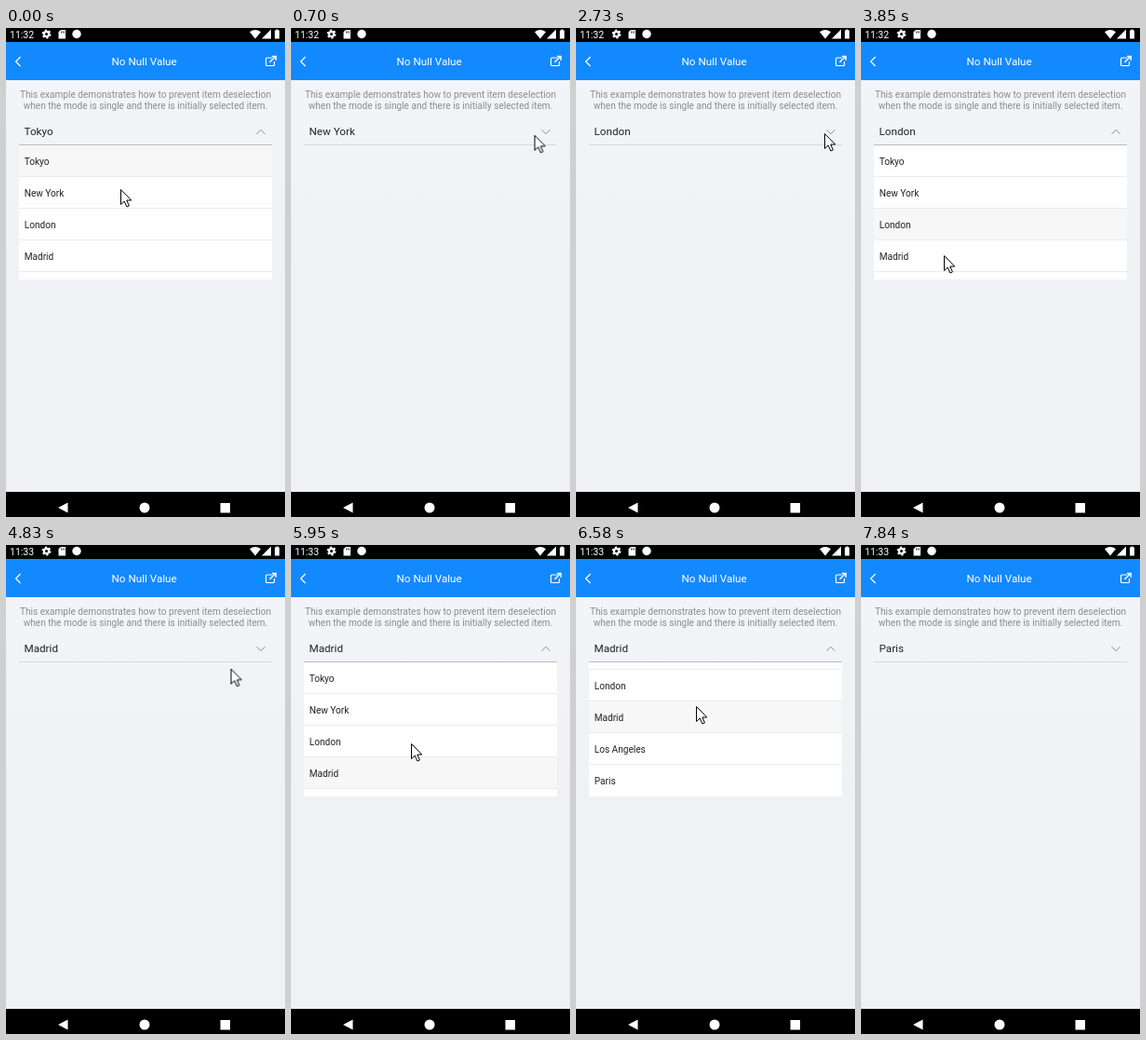
Animation of 300x525 px, one loop 9.8 s. Source, as an HTML page:

```html
<!DOCTYPE html>
<html lang="en">
<head>
<meta charset="utf-8">
<title>No Null Value</title>
<style>
html, body { margin: 0; width: 100%; height: 100%; overflow: hidden; background: #f0f1f4; }
svg { display: block; font-family: Roboto, sans-serif; }
.app { --pick: 0; --open: 1; --minute: 0; animation: state 9.8s step-end infinite; }
.title { font-size: 11.68px; fill: #fff; }
.hint { font-size: 10.1px; fill: #8b8c90; text-anchor: middle; }
.label { font-size: 11.68px; fill: #222; transform: translateY(calc(var(--pick) * -30px)); }
.clock { font-size: 10.5px; fill: #fff; transform: translateY(calc(var(--minute) * -20px)); }
.arrow { transform-origin: 274px 111.5px; transform: scaleY(calc(var(--open) * 2 - 1)); }
.line { opacity: calc(.45 + var(--open) * .55); }
.list { animation: fade 9.8s linear infinite; }
.items { font-size: 10.1px; fill: #222; animation: scroll 9.8s ease-out infinite; }
.chosen { fill: #f7f7f7; transform: translateY(calc(var(--pick) * 34px)); }
.cursor { animation: move 9.8s ease-in-out infinite; }

@keyframes state {
  0% { --pick: 0; --open: 1; --minute: 0; }
  1.43% { --pick: 1; }
  2.14% { --open: 0; }
  11.43% { --open: 1; }
  19.29% { --pick: 2; }
  20.71% { --open: 0; }
  31.43% { --open: 1; }
  42.14% { --pick: 3; }
  43.57% { --open: 0; }
  46.43% { --minute: 1; }
  54.29% { --open: 1; }
  72.86% { --pick: 5; }
  74.29% { --open: 0; }
  100% { --pick: 5; --open: 0; --minute: 1; }
}
@keyframes fade {
  0%, 2.14% { opacity: 1; }
  3.57%, 12.14% { opacity: 0; }
  13.57%, 20.71% { opacity: 1; }
  22.14%, 32.14% { opacity: 0; }
  34.29%, 43.57% { opacity: 1; }
  45%, 55% { opacity: 0; }
  56.43%, 74.29% { opacity: 1; }
  75.71%, 99.99% { opacity: 0; }
  100% { opacity: 1; }
}
@keyframes scroll {
  0%, 64.9% { transform: none; }
  67.1%, 80% { transform: translateY(-60px); }
  80.01%, 100% { transform: none; }
}
@keyframes move {
  0%, 2.14% { transform: translate(123px, 173px); animation-timing-function: linear; }
  5%, 5.71% { transform: translate(245px, 121px); animation-timing-function: ease-out; }
  8.57%, 12.14% { transform: translate(269px, 112px); }
  15% { transform: translate(73px, 211px); }
  17.14%, 20.71% { transform: translate(71px, 211px); }
  27.86% { transform: translate(267px, 113px); }
  29.29%, 32.14% { transform: translate(269px, 112px); }
  39.29% { transform: translate(89px, 244px); }
  40.71%, 43.57% { transform: translate(89px, 247px); }
  51.43%, 55% { transform: translate(269px, 112px); }
  60.71% { transform: translate(129px, 213px); }
  64.29%, 64.6% { transform: translate(129px, 249px); }
  67.14%, 67.86% { transform: translate(129px, 173px); }
  70.71%, 73.57% { transform: translate(129px, 252px); animation-timing-function: ease-in; }
  77.14%, 77.8% { transform: translate(184px, 430px); animation-timing-function: linear; }
  78.57% { transform: translate(219px, 507px); animation-timing-function: linear; }
  79.7%, 99.99% { transform: translate(235px, 540px); }
  100% { transform: translate(123px, 173px); }
}
</style>
</head>
<body>
<svg class="app" width="300" height="525" viewBox="0 0 300 525">
  <defs>
    <linearGradient id="page" x2="0" y2="1">
      <stop stop-color="#f3f4f7"/>
      <stop offset=".5" stop-color="#f0f1f4"/>
    </linearGradient>
  </defs>
  <rect y="56" width="300" height="442" fill="url(#page)"/>

  <!-- status bar -->
  <rect width="300" height="15"/>
  <svg x="4" width="30" height="15">
    <g class="clock"><text y="11">11:32</text><text y="31">11:33</text></g>
  </svg>
  <g fill="#fff">
    <circle cx="43.5" cy="6.5" r="2.6" fill="none" stroke="#fff" stroke-width="2.2"/>
    <circle cx="43.5" cy="6.5" r="4.2" fill="none" stroke="#fff" stroke-width="1.5" stroke-dasharray="2.2"/>
    <path d="M59 2h5v9.5h-7.500V4.200z"/>
    <path d="M59.500 3.500v2M61 3.500v2M62.500 3.500v2" stroke="#000" stroke-width=".7"/>
    <circle cx="76" cy="6.500" r="4.700"/>
    <path d="M262 4.300Q268 -.500 274 4.300L268 11.500z"/>
    <path d="M285 1.500v10h-10z"/>
    <path d="M290.500 1.500h2v1h1.500v9h-5v-9h1.500z"/>
  </g>

  <!-- header -->
  <rect y="15" width="300" height="41" fill="#1389ff"/>
  <text class="title" x="113.500" y="40.300">No Null Value</text>
  <g fill="none" stroke="#fff" stroke-width="1.200">
    <path d="M15.500 31l-5 5 5 5"/>
    <path d="M286 32h-5.500q-1 0-1 1v6.500q0 1 1 1h7q1 0 1-1V36"/>
    <path d="M283.500 36.800l6-6M286 30.500h4.200v4.200" stroke-width="1.500"/>
  </g>

  <text class="hint" x="150" y="74.700">This example demonstrates how to prevent item deselection</text>
  <text class="hint" x="150" y="86.700">when the mode is single and there is initially selected item.</text>

  <!-- combo box -->
  <svg x="19.500" y="96" width="200" height="28">
    <g class="label">
      <text y="19">Tokyo</text>
      <text y="49">New York</text>
      <text y="79">London</text>
      <text y="109">Madrid</text>
      <text y="139">Los Angeles</text>
      <text y="169">Paris</text>
    </g>
  </svg>
  <path class="arrow" d="M269.500 113.800l4.500-4.500 4.500 4.500" fill="none" stroke="#8b8c90"/>
  <path class="line" d="M14 125.500h272" stroke="#b9bbc1"/>

  <svg class="list" x="14" y="126" width="272" height="144">
    <rect width="272" height="144" fill="#fefefe"/>
    <g class="items">
      <rect class="chosen" width="272" height="34"/>
      <path d="M0 33.500h272M0 67.500h272M0 101.500h272M0 135.500h272M0 169.500h272" stroke="#ececee"/>
      <g transform="translate(5.700 21)">
        <text>Tokyo</text>
        <text y="34">New York</text>
        <text y="68">London</text>
        <text y="102">Madrid</text>
        <text y="136">Los Angeles</text>
        <text y="170">Paris</text>
      </g>
    </g>
  </svg>

  <!-- navigation bar -->
  <rect y="498" width="300" height="27"/>
  <g fill="#fff">
    <path d="M66.500 509.500v11l-10.500-5.500z"/>
    <circle cx="149" cy="515" r="5.500"/>
    <rect x="230.500" y="510" width="10.500" height="10.500"/>
  </g>

  <path class="cursor" d="M.500.500v16l3.700-3.500 2.700 6 2.500-1.100-2.600-5.900h5z" fill="#fff" stroke="#000"/>
</svg>
</body>
</html>
```
